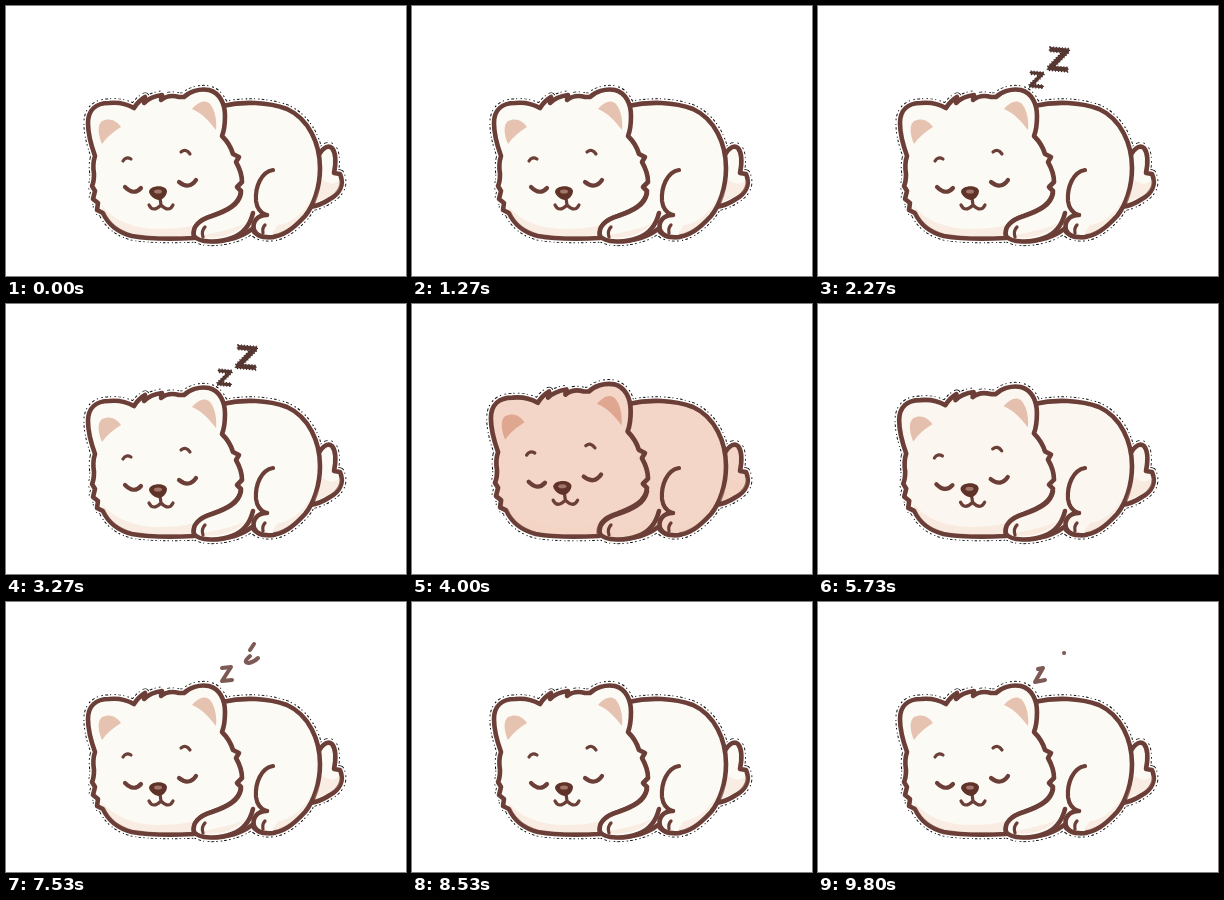
Write an HTML page that moves like this. It is 400 px wide and 270 px high and loops after 10 s.

```html
<!DOCTYPE html>
<html lang="en">
<head>
<meta charset="utf-8">
<title>Sleeping bear cub</title>
<style>
html, body { margin: 0; width: 100%; height: 100%; overflow: hidden; background: #fff; }
svg { display: block; width: 400px; height: 270px; --fur: #fcfaf4; stroke-linejoin: round; }
.edge { fill: none; stroke: #111; stroke-width: 9.2; stroke-dasharray: 1.5 2 2.5 2 1 3; }
.halo { fill: #fff; stroke: #fff; stroke-width: 7.4; }
.ink, .line, .wisp { stroke-linecap: round; }
.ink { fill: var(--fur); stroke: #6b3f37; stroke-width: 4.6; }
.line { fill: none; stroke: #6b3f37; stroke-width: 4.2; }
.thin { stroke-width: 3.2; }
.shade { fill: #f2cdbb; opacity: .3; }
.ear { fill: #e9c6b8; mix-blend-mode: multiply; }
.head { transform-origin: 235px 232px; }
.z { font: bold 22px "DejaVu Sans", sans-serif; fill: #553631; }
.z text { paint-order: stroke; stroke: #211; stroke-width: 1.6; stroke-dasharray: 1 2; }
.wisp { fill: none; stroke: #7d5a55; stroke-width: 4; }
</style>
</head>
<body>
<svg viewBox="0 0 400 270">
  <defs>
    <path id="tail" d="M311 154C314 144 321 138 326 142C330 147 330 157 328 167L334 168C339 179 333 188 324 193C318 197 311 200 304 201Z"/>
    <path id="body" d="M216 100C238 95 262 96 281 103C303 113 314 138 314 162C314 181 308 199 299 210C288 222 277 231 263 231C255 231 249 229 246 223C236 231 224 235 206 235L190 220Z"/>
    <path id="head" d="M89 150C85 139 82 128 82 117C82 104 90 97 103 97C112 96 121 98 128 102C131 97 134 94 139 91L138 97C143 92 149 90 156 89L155 94C160 90 166 89 173 91L178 91C183 86 193 82 203 84C214 87 219 98 219 110C219 119 218 125 216 130C222 136 225 141 227 148L233 151L230 156C234 163 236 169 236 176L231 181L235 185C234 198 222 204 206 210C193 214 186 221 188 232C166 233 143 233 126 230C111 226 102 218 97 207L91 204L92 197L87 193L89 185L86 180C88 176 88 171 88 168C87 162 87 156 89 150Z"/>
    <path id="arm" d="M235 187C233 199 221 205 206 210C193 214 186 221 188 230C193 237 213 237 226 232C237 228 244 219 247 207"/>
    <g id="back"><use href="#tail"/><use href="#body"/></g>
  </defs>

  <g class="edge"><use href="#back"/><use href="#head" class="head"/><use href="#arm"/></g>
  <g class="halo"><use href="#back"/><use href="#head" class="head"/><use href="#arm"/></g>

  <g class="ink"><use href="#back"/></g>
  <path class="shade" d="M317 174C324 179 330 179 334 173C336 182 330 189 322 191L308 197Z"/>
  <path class="shade" d="M311 176C305 203 286 218 272 219L265 229C281 229 303 209 311 176Z"/>
  <path class="line" d="M267 164C255 166 249 181 250 195C251 203 255 207 260 209"/>
  <path class="ink" d="M261 209C251 209 246 216 248 224C251 231 259 232 268 231"/>
  <path class="line thin" d="M259 219Q256 222 257 227"/>

  <g class="head">
    <use href="#head" class="ink"/>
    <path class="shade" d="M95 198C106 214 126 222 150 223C166 223 178 222 188 219Q186 225 187 230C165 231 143 231 127 228C108 224 100 212 95 198Z"/>
    <path class="ear" d="M96 138C92 129 91 119 96 115C104 111 111 115 115 121C107 126 101 131 96 138Z"/>
    <path class="ear" d="M186 103C191 97 198 93 203 97C209 103 211 114 210 124C203 115 196 107 186 103Z"/>
    <g id="face">
      <path class="line thin" d="M117 155Q120 150 125 153M175 146Q180 142 184 148"/>
      <path class="line" d="M119 181Q128 190 135 182M173 176Q183 184 190 174"/>
      <path class="line thin" d="M154 192L155 199M143 199Q147 207 155 199Q163 207 167 199"/>
      <path d="M143 186C143 179 160 178 161 185C161 190 156 194 153 194C149 194 144 190 143 186Z" fill="#603329"/>
      <ellipse cx="152" cy="185.500" rx="4" ry="2" fill="#a3766b"/>
    </g>
  </g>
  <use href="#arm" class="ink"/>
  <path class="shade" d="M193 230C206 234 228 231 240 217C229 223 211 226 193 230Z"/>
  <path class="line thin" d="M199 221Q195 225 197 231"/>

  <g class="z">
    <text id="small" transform="translate(210 81) rotate(5)">Z</text>
    <text id="large" transform="translate(228 64) rotate(5)" style="font-size:32px">Z</text>
    <text id="top" transform="translate(250 38) rotate(5)" style="font-size:38px">Z</text>
  </g>
  <g class="wisp">
    <path id="fadeSmall" d="M216 66L225 65L216 79L226 78"/>
    <path id="fadeLarge" d="M248 42L244 48M244 54Q236 61 243 61Q248 60 252 56"/>
    <path id="hook" d="M220 67L225 66L217 80L227 78M246 51h.1"/>
  </g>
</svg>
<script>
const LOOP = 10000;
const svg = document.querySelector('svg');
const heads = document.querySelectorAll('.head');
const face = document.getElementById('face');

// Visible spans in ms
const spans = {
  small: [[1730, 3530], [6530, 7530]],
  large: [[1730, 3530], [6530, 7530]],
  top: [[6730, 7000]],
  fadeSmall: [[3530, 3730], [7530, 7730]],
  fadeLarge: [[3530, 3730], [7530, 7730]],
  hook: [[1530, 1730], [6270, 6530], [9800, LOOP]]
};
const swell = [[3530, 0], [4000, .45], [4730, 1], [5000, 1], [5730, .12], [6270, 0]];
const warmth = [[3530, 0], [4000, 1], [4730, .9], [5270, .4], [5730, .1], [6270, 0]];

// Four held poses per second
function hold(t) {
  const sec = Math.floor(t / 1000) * 1000;
  const beats = [0, 270, 530, t < 8000 ? 730 : 800];
  return sec + beats.filter(b => b <= t - sec).pop();
}

function track(points, t) {
  const i = points.findIndex(p => p[0] > t);
  if (i < 1) return 0;
  const [t0, a] = points[i - 1], [t1, b] = points[i];
  return a + (b - a) * (t - t0) / (t1 - t0);
}

const mix = (a, b, k) => a.map((v, i) => Math.round(v + (b[i] - v) * k));

function draw(now) {
  const t = hold(now % LOOP);
  const s = track(swell, t);
  const lift = Math.min(1, 2.2 * s);
  heads.forEach(h => h.style.transform = `scale(${1 + .045 * s}, ${1 + .025 * lift})`);
  face.style.transform = `translateY(${-2 * lift}px)`;
  const fur = mix([252, 250, 244], [244, 214, 200], track(warmth, t));
  svg.style.setProperty('--fur', `rgb(${fur})`);
  for (const id in spans) {
    const on = spans[id].some(([a, b]) => t >= a && t < b);
    document.getElementById(id).style.visibility = on ? 'visible' : 'hidden';
  }
}

let start;
function tick(now) {
  start ??= now;
  draw(Math.max(0, now - start));
  requestAnimationFrame(tick);
}
draw(0);
requestAnimationFrame(tick);
</script>
</body>
</html>
```
